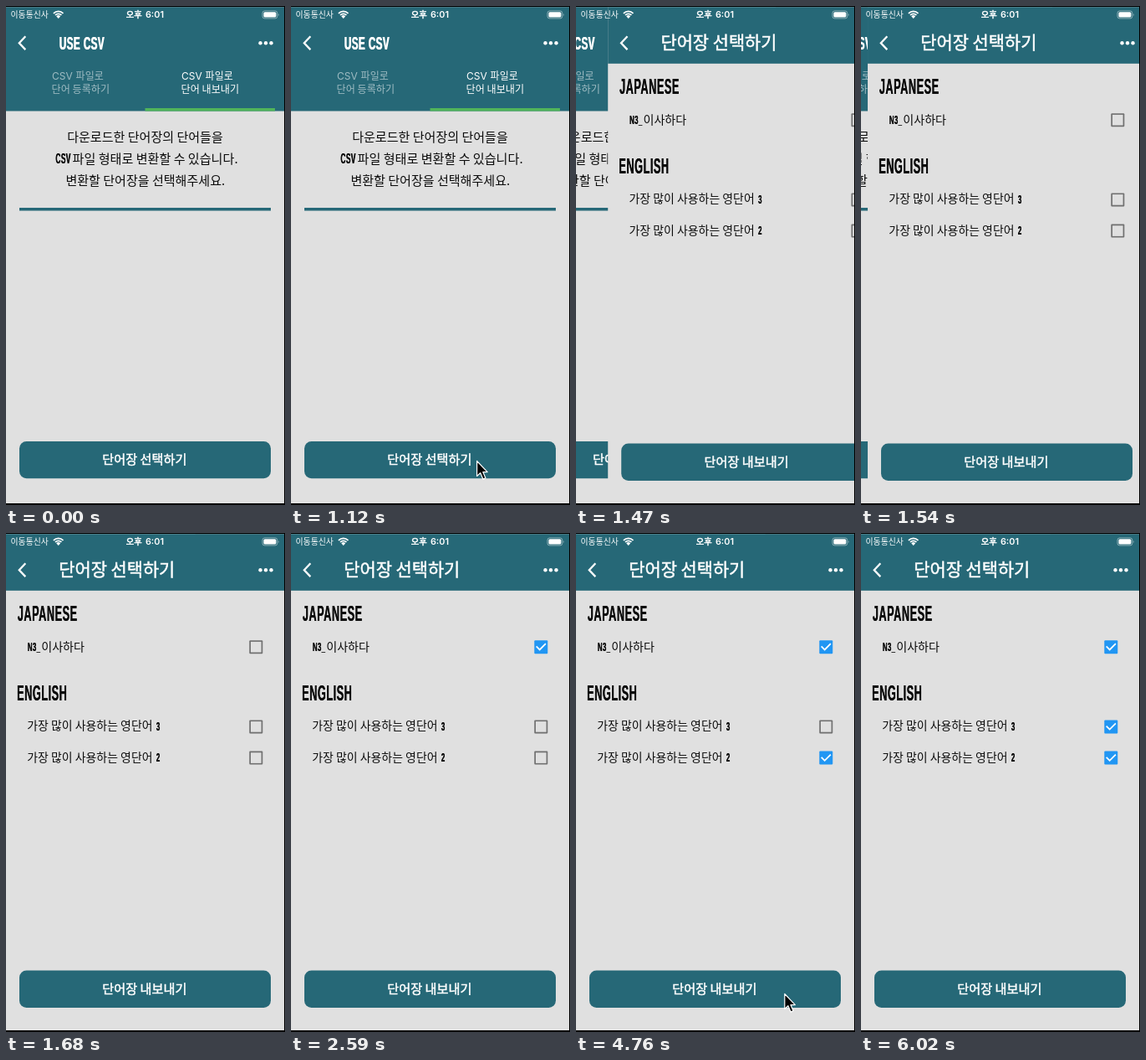
Write an HTML page that moves like this. It is 334 px wide and 596 px high and loops after 8.47 s.

```html
<!DOCTYPE html>
<html lang="ko">
<head>
<meta charset="utf-8">
<title>단어장 내보내기</title>
<style>
  html, body { margin: 0; width: 100%; height: 100%; overflow: hidden; background: #000; }
  svg { display: block; width: 334px; height: 596px; }
  text { white-space: pre; }
  .ko { font-family: "Noto Sans CJK KR", "Noto Sans CJK JP", "Noto Sans CJK", sans-serif; word-spacing: -.06em; }
  .ui { font-family: Inter, "Noto Sans CJK KR", sans-serif; }
  .head { font-family: "Liberation Sans", Arial, sans-serif; font-weight: 700; letter-spacing: .04em; }
  .heavy { stroke: currentColor; stroke-width: .5; }
</style>
</head>
<body>
<svg id="stage" viewBox="0 0 334 596" xmlns="http://www.w3.org/2000/svg"></svg>
<script>
const LOOP = 8470, STEP = 70, W = 334;
const TEAL = '#266877', PAPER = '#e0e0e0', INK = '#0c0c0c', WHITE = '#fff';
const GREY = [112, 112, 112], BLUE = [33, 150, 243];
const SLIDE_AT = 1330, EDGE = 16;

const rect = (x, y, w, h, fill, r = 0) =>
  `<rect x="${x}" y="${y}" width="${w}" height="${h}" rx="${r}" fill="${fill}"/>`;
const text = (s, x, y, size, fill = INK, cls = 'ko', extra = '') =>
  `<text class="${cls}" x="${x}" y="${y}" font-size="${size}" fill="${fill}" color="${fill}" ${extra}>${s}</text>`;
const heavy = (s, x, y, size) => text(s, x, y, size, WHITE, 'ko heavy');

// Narrow display face: condensed capitals, thickened sideways.
const display = (s, x, y, size, fill = INK, grow = .15) => [-grow, grow].map(d =>
  `<g transform="translate(${x + d} ${y}) scale(.51 1)">${text(s, 0, 0, size, fill, 'head')}</g>`).join('');

const navIcons = () =>
  `<path d="M23.3 36.3L15.8 44.2L23.3 52.1" fill="none" stroke="#fff" stroke-width="2.3"/>` +
  [304.5, 311, 317.5].map(x => `<circle cx="${x}" cy="44.2" r="2.2" fill="#fff"/>`).join('');

const button = (y, label) =>
  rect(16, y, 301, 44.3, TEAL, 8.5) + heavy(label, 115.3, y + 27.1, 15.2);

function exportPage() {
  const faded = '#9fbcc3';
  return rect(0, 0, W, 596, PAPER) + rect(0, 0, W, 125.5, TEAL) + navIcons() +
    display('USE CSV', 63.9, 51.8, 22.8, WHITE, .35) +
    text('CSV', 55, 87.6, 12, faded, 'ui') + text('파일로', 83.6, 87.8, 12, faded) +
    text('단어 등록하기', 54.6, 103.6, 12.1, faded) +
    text('CSV', 210, 87.6, 12, WHITE, 'ui') + text('파일로', 238.6, 87.8, 12, WHITE) +
    text('단어 내보내기', 209.6, 103.6, 12.1, WHITE) +
    rect(166.5, 122, 155.5, 3.5, '#50b45a') +
    text('다운로드한 단어장의 단어들을', 73.2, 162.4, 15.05) +
    display('CSV', 59.4, 187.8, 16.5) +
    text('파일 형태로 변환할 수 있습니다.', 79.6, 188, 15.1) +
    text('변환할 단어장을 선택해주세요.', 71.4, 213.6, 15.05) +
    rect(16, 241, 301, 3.5, TEAL) +
    button(520, '단어장 선택하기');
}

const boxes = [
  { y: 136.2, at: 2310, ripple: true },
  { y: 231.4, at: 5740 },
  { y: 268.6, at: 3500 }
];

const checkbox = b => `<g class="box" transform="translate(299.3 ${b.y})">
  <circle fill="rgb(${BLUE})"/><rect rx="1"/><rect fill="${PAPER}"/>
  <path d="M-5.6 -.8L-1.6 3.2L5.6 -4" pathLength="1" stroke-dasharray="1 2"
    fill="none" stroke="#fff" stroke-width="1.8"/></g>`;

function pickPage() {
  const word = '가장 많이 사용하는 영단어';
  return rect(0, 0, W, 596, PAPER) + rect(0, 0, W, 68.8, TEAL) + navIcons() +
    heavy('단어장 선택하기', 63.2, 51.2, 20.9) +
    display('JAPANESE', 13.8, 105, 25) +
    display('N3_', 25.9, 140.8, 15.5) + text('이사하다', 42.2, 140.8, 14.1) +
    display('ENGLISH', 13.2, 200, 25) +
    text(word, 25.3, 235.4, 13.95) + display('3', 179.8, 235.6, 15.5) +
    text(word, 25.3, 272.8, 13.95) + display('2', 179.8, 273, 15.5) +
    boxes.map(checkbox).join('') +
    button(522.6, '단어장 내보내기');
}

function statusBar() {
  const arc = (r, w) => {
    const d = r * .7;
    return `<path d="M${62.7 - d} ${14.6 - d}A${r} ${r} 0 0 1 ${62.7 + d} ${14.6 - d}"
      fill="none" stroke="#fff" stroke-width="${w}"/>`;
  };
  return text('이동통신사', 5.5, 14.3, 9.9, WHITE) +
    arc(8.3, 1.8) + arc(5.3, 1.8) + '<path d="M62.7 15L60.2 12.2A3.6 3.6 0 0 1 65.2 12.2Z" fill="#fff"/>' +
    text('오후', 143.7, 14.3, 10.3, WHITE, 'ko heavy') +
    text('6:01', 189, 14.3, 10.8, WHITE, 'ui', 'font-weight="600" text-anchor="end"') +
    '<rect x="307" y="5.9" width="17.8" height="9" rx="2.6" fill="none" stroke="#fff" stroke-opacity=".5" stroke-width=".9"/>' +
    rect(308.4, 7.3, 15, 6.2, WHITE, 1.5) +
    '<path d="M325.9 8.9Q327.4 10.4 325.9 11.9Z" fill="#fff" fill-opacity=".6"/>';
}

const stage = document.getElementById('stage');
stage.innerHTML = `
  <clipPath id="screen"><rect y="1.2" width="333" height="592.8"/></clipPath>
  <g clip-path="url(#screen)">
    <g id="back">${exportPage()}</g>
    <g id="front">${pickPage()}</g>
    ${statusBar()}
  </g>
  <path id="cursor" d="M0 0V18L4.1 14.2L7.3 21.6L10.3 20.3L7.2 13.1H12.6Z"
    fill="#000" stroke="#fff" stroke-width="1.2" stroke-linejoin="round"/>`;

const back = document.getElementById('back');
const front = document.getElementById('front');
const cursor = document.getElementById('cursor');
const boxNodes = [...stage.querySelectorAll('.box')];

const clamp = v => Math.max(0, Math.min(1, v));
const set = (el, attrs) => { for (const k in attrs) el.setAttribute(k, attrs[k]); };
const square = (el, size) => set(el, { x: -size / 2, y: -size / 2, width: size, height: size });

function drawBox(node, b, t) {
  const [ring, outer, inner, tick] = node.children;
  const p = clamp((t - b.at + STEP) / (5 * STEP));
  const size = EDGE - 1.8 * (1 - Math.abs(2 * p - 1));
  const mix = clamp(p * 4);
  square(outer, size);
  outer.setAttribute('fill', `rgb(${GREY.map((g, i) => Math.round(g + (BLUE[i] - g) * mix))})`);
  square(inner, Math.max(0, size - 2 * (1.7 + EDGE * p)));
  const drawn = clamp(p * 2 - 1);
  set(tick, { 'stroke-dashoffset': 1 - drawn, opacity: drawn > 0 ? 1 : 0 });
  set(ring, {
    r: b.ripple ? 17.5 * clamp(p * 2) : 0,
    opacity: p > 0 ? .14 * clamp((1 - p) * 2.5) : 0
  });
}

// Share of the stage the incoming page still has to cross.
function remaining(t) {
  if (t < SLIDE_AT) return 1;
  const k = (t - SLIDE_AT) / STEP;
  if (k < 1) return .93;
  return k < 5 ? .545 * .21 ** (k - 1) : 0;
}

function draw(time) {
  const t = Math.floor((time % LOOP) / STEP) * STEP;
  const rest = remaining(t);
  set(back, { transform: `translate(${-.322 * (1 - rest) * W} 0)` });
  set(front, { transform: `translate(${rest * W} 0)`, visibility: rest < 1 ? 'visible' : 'hidden' });
  boxNodes.forEach((node, i) => drawBox(node, boxes[i], t));
  const first = t >= 1120 && t < SLIDE_AT, second = t >= 4760 && t < 4900;
  set(cursor, {
    visibility: first || second ? 'visible' : 'hidden',
    transform: first ? 'translate(222.6 543.5)' : 'translate(249.8 550.5)'
  });
}

const start = performance.now();
function tick() {
  draw(performance.now() - start);
  requestAnimationFrame(tick);
}
tick();
</script>
</body>
</html>
```
